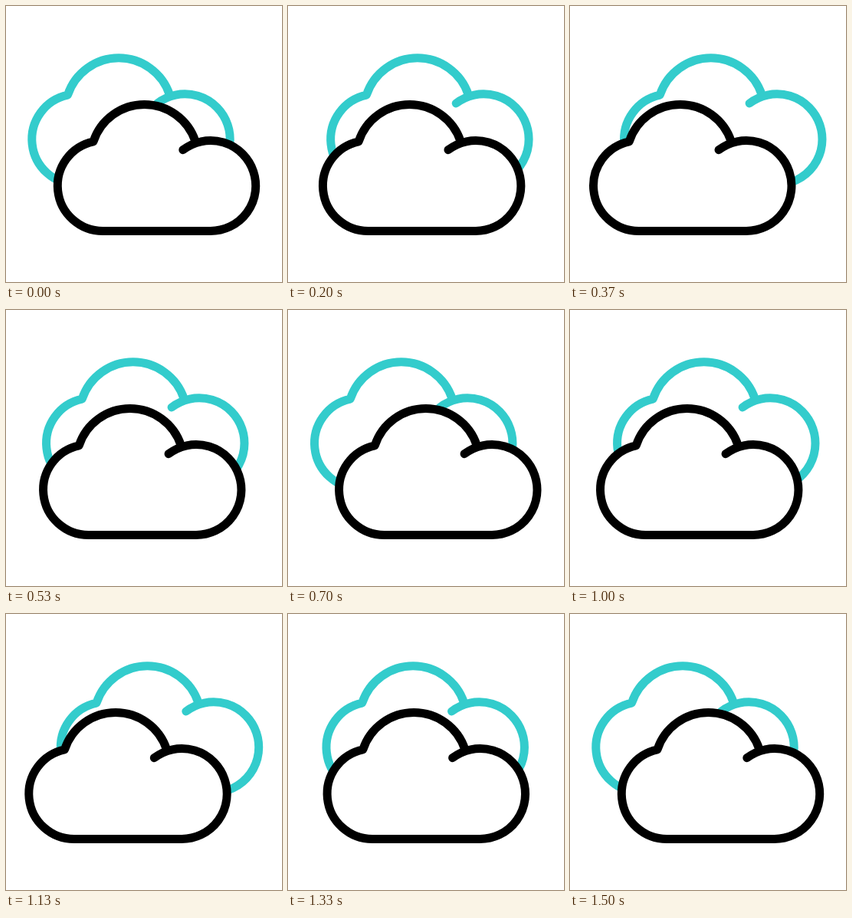
Write an HTML page that moves like this. It is 360 by 360 pixels and loops after 1670 ms.

```html
<!DOCTYPE html>
<html lang="en">
<head>
<meta charset="utf-8">
<title>Drifting clouds</title>
<style>
  html, body { margin: 0; height: 100%; overflow: hidden; background: #fff; }
  svg { display: block; width: 100vw; height: 100vh; }
  use { stroke-width: 11; stroke-linecap: round; stroke-linejoin: round; fill: #fff; }
</style>
</head>
<body>
<svg viewBox="0 0 360 360">
  <defs>
    <path id="cloud" d="M230.8 187.7 A59 59 0 1 1 266.5 293.5 H126.5 A59 59 0 0 1 114 176.8 A70 70 0 0 1 247 176.6"/>
  </defs>
  <use id="back" href="#cloud" stroke="#33cccc"/>
  <use id="front" href="#cloud" stroke="#000"/>
</svg>
<script>
  const LOOP = 1670, FPS = 30, REACH = 37.5;
  // Turning points of the sway, in animation steps; even ones are at rest.
  const turns = [1, 10, 22, 34, 45];
  const back = document.getElementById('back');
  const front = document.getElementById('front');

  const ease = p => p * p * (3 - 2 * p);

  function sway(step) {
    if (step <= turns[0] || step >= turns[4]) return 0;
    const i = turns.findIndex(t => t > step) - 1;
    const p = ease((step - turns[i]) / (turns[i + 1] - turns[i]));
    return REACH * (i % 2 ? 1 - p : p);
  }

  function draw(now) {
    const step = Math.floor((now % LOOP + 5) * FPS / 1000);
    const x = sway(step);
    front.setAttribute('transform', `translate(${-x} 0)`);
    back.setAttribute('transform', `translate(${x - 33.5} -60.7)`);
  }

  let start;
  function tick(now) {
    start ??= now;
    draw(now - start);
    requestAnimationFrame(tick);
  }
  draw(0);
  requestAnimationFrame(tick);
</script>
</body>
</html>
```
